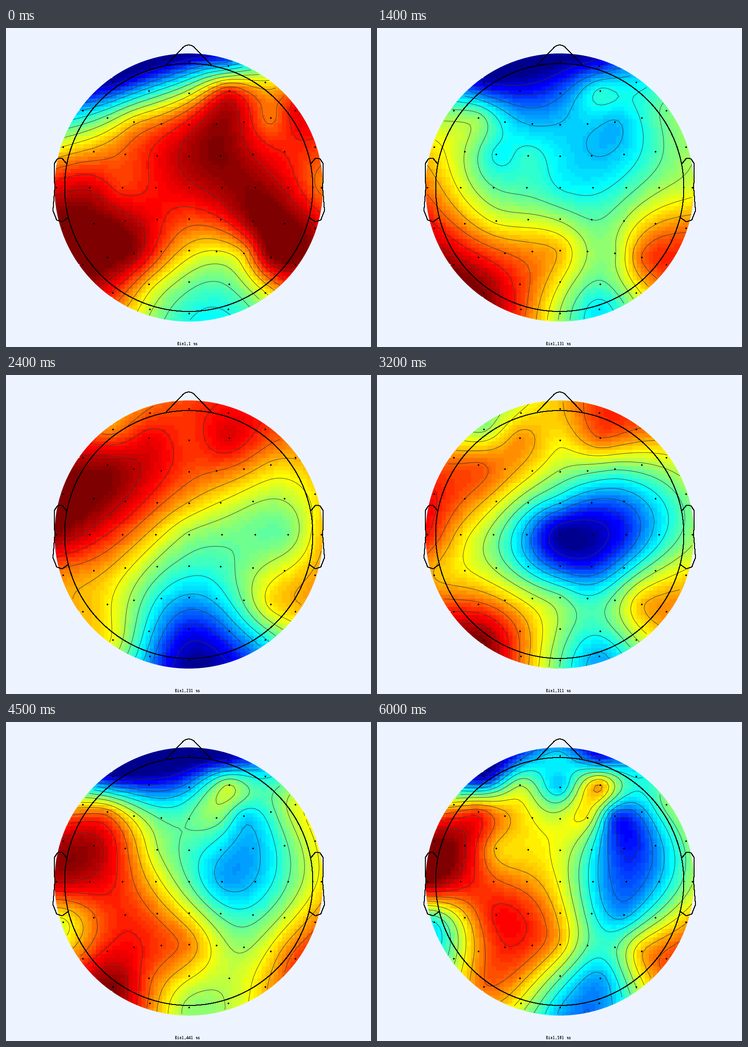
A matplotlib script that plays this animation: 800x700 px, repeating every 6100 ms.

```python
import matplotlib.pyplot as plt
import numpy as np
from matplotlib.animation import FuncAnimation
from matplotlib.colors import ListedColormap
from matplotlib.patches import Circle

plt.rcParams["text.antialiased"] = False

W, H, DPI = 800, 700, 100
PX = 72 / DPI                # one pixel in points
CX, CY = 400.5, 350
HEAD_R, DISC_R, GRID_R = 272, 294.2, 299.4
GRID_N = 67
LEVELS = np.arange(1, 13) / 13
FRAMES, INTERVAL = 61, 100


# --- electrode cap: each row mirrors left-right, front rows also to the back

sites = {}


def add_row(name, ranks, xs, ys, side=1):
    sites[name + "z"] = (0, side * ys[0])
    for rank, x, y in zip(ranks, xs[1:], ys[1:]):
        sites[f"{name}{rank}"] = (-x, side * y)
        sites[f"{name}{rank + 1}"] = (x, side * y)


for front, back, ranks, xs, ys in [
        ("Fp", "O", [1], [0, 86], [276, 267]),
        ("AF", "PO", [3, 7], [0, 88, 167], [207, 212, 231]),
        ("F", "P", [1, 3, 5, 7], [0, 60.5, 120.5, 179, 233],
         [138, 140, 144, 153, 169]),
        ("FC", "CP", [1, 3, 5, 7], [0, 69.5, 140, 209, 276],
         [69, 70, 73, 79, 89])]:
    add_row(front, ranks, xs, ys)
    add_row(back, ranks, xs, ys, -1)
add_row("C", [1, 3, 5, 7], 72.6 * np.arange(5), np.zeros(5))


# --- scalp maps: a thin-plate spline through a few peaks and valleys --

axis = np.linspace(-GRID_R, GRID_R, GRID_N)
gx, gy = np.meshgrid(axis, axis)
outside = np.hypot(gx, gy) > GRID_R + 0.01
grid = np.column_stack([gx.ravel(), gy.ravel()]) / GRID_R


def basis(a, b):
    d = np.linalg.norm(a[:, None] - b[None], axis=2)
    plane = np.column_stack([np.ones(len(a)), a])
    return np.hstack([d**2 * np.log(np.maximum(d, 1e-12)), plane])


def scalp_map(**percent):
    """Smooth field that takes the given value at each named electrode."""
    at = np.array([sites[name] for name in percent]) / GRID_R
    values = np.array(list(percent.values())) / 100
    top = basis(at, at)
    bottom = np.hstack([top[:, -3:].T, np.zeros((3, 3))])
    weights = np.linalg.solve(np.vstack([top, bottom]), np.r_[values, 0, 0, 0])
    z = basis(grid, at) @ weights
    return np.clip(z, 0, 1).reshape(GRID_N, GRID_N)


maps = {
    1: scalp_map(Fp2=30, AF7=4, AFz=58, AF4=84, AF8=63, F3=67, F6=75, F8=88,
                 FC2=99, C5=91, C3=82, C8=75, CPz=80, CP4=99,
                 P3=97, P4=69, P6=98, PO7=84, PO3=66, PO8=61),
    61: scalp_map(Fp2=27, AF7=6, AFz=43, AF4=73, AF8=52, F7=35, F2=76, F6=53,
                  FC5=70, FC1=68, FC6=57, C3=57, C8=70, CP5=65, CP2=54,
                  P3=84, Pz=70, P6=99, PO7=83, PO4=55, PO3=58, Oz=69),
    131: scalp_map(Fp2=14, AF7=7, AFz=21, AF4=40, F5=50, F1=30, F4=30, F8=48,
                   FC3=37, FC1=41, C7=75, Cz=38, C8=58, CP3=60, CP2=46,
                   Pz=68, P4=53, P6=77, PO7=99, O2=35),
    231: scalp_map(Fp2=87, AF7=74, AF3=88, AFz=82, AF4=90, F5=97, F6=68,
                   FCz=69, C7=98, Cz=53, C6=49, C8=68, CP7=74, CPz=43,
                   P1=37, P6=64, PO7=61, POz=14, PO8=38, Oz=3),
    311: scalp_map(Fpz=68, AF7=52, AF3=72, AFz=63, AF4=77, F5=78, F4=47,
                   F8=60, FCz=31, C7=85, C5=66, Cz=1, C4=15, C8=51, CP7=69,
                   CP2=15, Pz=48, P6=68, PO7=99, O1=76, O2=29),
    441: scalp_map(Fp2=8, AF7=5, AFz=27, AF4=53, AF8=36, F5=71, F2=49, F4=33,
                   F8=57, FC1=53, C7=90, C2=28, C8=62, CP7=58, CP3=81,
                   Pz=72, P4=51, P8=78, PO7=97, PO3=77, Oz=50),
    591: scalp_map(Fpz=34, Fp2=18, AF7=5, AF3=53, AFz=32, AF4=70, F5=81,
                   F2=61, F4=19, F8=49, FC3=68, C7=99, Cz=60, C8=53,
                   CP7=38, CP3=86, CP4=28, Pz=68, P6=68, PO7=76, PO4=28,
                   Oz=31),
}
moments = np.array(list(maps))
stack = np.array(list(maps.values()))


def field(ms):
    """Blend the neighbouring maps and fill the whole colour range."""
    pos = np.interp(ms, moments, np.arange(len(moments)))
    i = min(int(pos), len(moments) - 2)
    z = stack[i] + (pos - i) * (stack[i + 1] - stack[i])
    z = np.ma.array(z, mask=outside)
    return (z - z.min()) / (z.max() - z.min())


def jet64():
    x = np.arange(1, 65) / 64
    rgb = [np.clip(1.5 - np.abs(4 * x - k), 0, 1) for k in (3, 2, 1)]
    return ListedColormap(np.column_stack(rgb))


# --- stage ------------------------------------------------------------

fig = plt.figure(figsize=(W / DPI, H / DPI), dpi=DPI, facecolor="#edf4ff")
ax = fig.add_axes([0, 0, 1, 1])
ax.axis("off")

disc = Circle((CX, CY), DISC_R, transform=ax.transData)
edge = GRID_R + GRID_R / (GRID_N - 1)
cells = ax.imshow(np.zeros((GRID_N, GRID_N)), cmap=jet64(), vmin=0, vmax=1,
                  origin="lower", interpolation="nearest", aspect="auto",
                  extent=(CX - edge, CX + edge, CY + edge, CY - edge))
cells.set_clip_path(disc)


def outline(x, y):
    ax.plot(CX + HEAD_R * 2 * np.array(x), CY - HEAD_R * 2 * np.array(y),
            color="black", lw=PX, aa=False, zorder=4)


turn = np.linspace(0, 2 * np.pi, 200)
outline(np.cos(turn) / 2, np.sin(turn) / 2)
outline([-.09, -.021, -.011, 0, .011, .021, .09],
        [.495, .567, .573, .575, .573, .567, .495])
ear_x = np.array([.492, .510, .518, .530, .542, .540, .547, .532, .510, .484])
ear_y = [.0955, .1175, .1183, .1146, .0955, -.0055, -.0932, -.1313, -.1384,
         -.1199]
outline(ear_x, ear_y)
outline(-ear_x, ear_y)

dots = np.array(list(sites.values()))
ax.plot(CX + dots[:, 0], CY - dots[:, 1], "o", color="black",
        ms=3.6 * PX, mew=0, aa=False, zorder=5)
label = ax.text(397.5, 693.5, "", ha="center", va="center", color="black",
                family="DejaVu Sans Mono", size=8.3 * PX)
lines = []


def draw(n):
    ms = 10 * max(n - 1, 0) + 1
    z = field(ms)
    cells.set_data(z)
    while lines:
        lines.pop().remove()
    contour = ax.contour(CX + gx, CY - gy, z, levels=LEVELS,
                         colors="#333333", linewidths=0.9 * PX,
                         antialiased=True, corner_mask=False, zorder=3)
    contour.set_clip_path(disc)
    lines.append(contour)
    ax.set(xlim=(0, W), ylim=(H, 0))
    label.set_text(f"Bin1,{ms} ms")


anim = FuncAnimation(fig, draw, frames=FRAMES, interval=INTERVAL,
                     repeat=True, repeat_delay=0)
plt.show()
```
